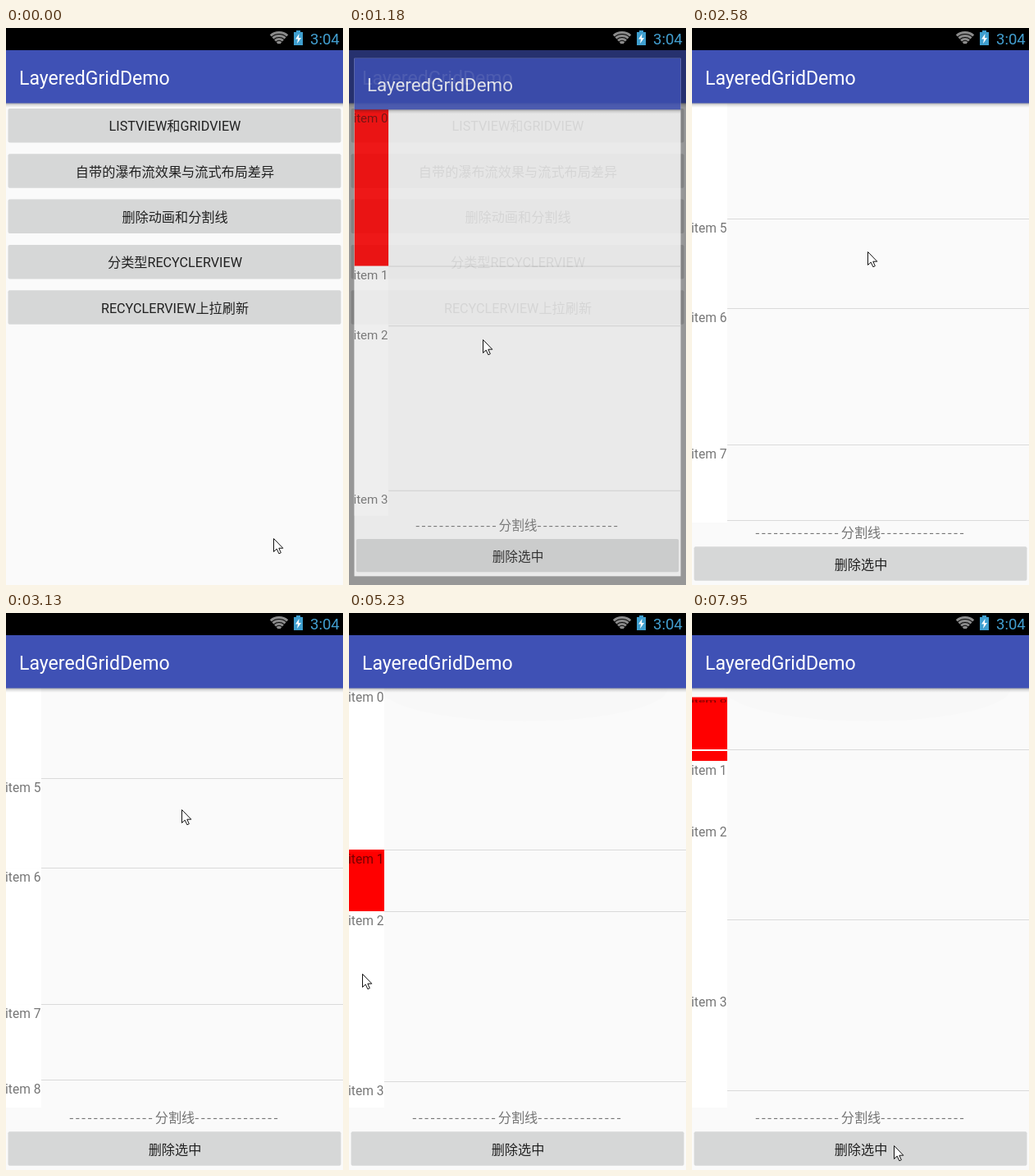
Animation of 411 by 678 pixels, one loop 8 s. Source, as an HTML page with a canvas:

```html
<!DOCTYPE html>
<html lang="zh-CN">
<head>
<meta charset="utf-8">
<style>
html, body { margin: 0; width: 100%; height: 100%; overflow: hidden; background: #fafafa; }
canvas { display: block; width: 411px; height: 678px; }
</style>
</head>
<body>
<canvas></canvas>
<script>
const W = 411, H = 678, LOOP = 8000;
const ratio = window.devicePixelRatio || 1;
const canvas = document.querySelector('canvas');
const layer = document.createElement('canvas');
canvas.width = layer.width = W * ratio;
canvas.height = layer.height = H * ratio;
const ctx = canvas.getContext('2d');
const layerCtx = layer.getContext('2d');

const FONT = 'Roboto, "Noto Sans CJK SC", sans-serif';
const DASH_FONT = '"Noto Sans CJK SC", Roboto, sans-serif';
const TITLE = 'LayeredGridDemo';
const MENU = ['LISTVIEW和GRIDVIEW', '自带的瀑布流效果与流式布局差异', '删除动画和分割线',
  '分类型RECYCLERVIEW', 'RECYCLERVIEW上拉刷新'];
const HEIGHTS = [197, 75, 207, 208, 180, 109, 166, 92, 180];
const LIST_TOP = 91, LIST_END = 602, COLUMN = 43;
const OPEN_AT = 1000, REMOVE_AT = 7700;
const SCROLL_AT = 1420, SCROLL_TIME = 2935, SWIPE = 585;

// Where the pointer rests and when it gets there.
const STOPS = [
  { at: 0, x: 326, y: 621 },
  { at: 720, x: 185, y: 236 },
  { at: 1180, x: 163, y: 379 },
  { at: 2580, x: 214, y: 271 },
  { at: 3750, x: 200, y: 210 },
  { at: 4080, x: 190, y: 560 },
  { at: 4600, x: 15, y: 316 },
  { at: 5200, x: 16, y: 439 },
  { at: 6180, x: 26, y: 205 },
  { at: 6940, x: 357, y: 645 },
  { at: 7260, x: 246, y: 648 },
];
const ARROW = new Path2D('M0 0V16L3.7 12.6 6.4 18.3 8.8 17.2 6.3 11.7H11.3Z');
const BOLT = new Path2D('M357.5 7 353 13.5H356L355 19 360 12H357Z');

const clamp = v => Math.min(1, Math.max(0, v));
const ease = u => (1 - Math.cos(Math.PI * clamp(u))) / 2;
const scrollAt = t => 810.6 * Math.sin(Math.PI * clamp((t - SCROLL_AT) / SCROLL_TIME)) ** 2;

function rect(x, y, w, h, color) {
  ctx.fillStyle = color;
  ctx.fillRect(x, y, w, h);
}

function text(str, x, y, size, color, align = 'left', font = FONT) {
  ctx.font = `${size}px ${font}`;
  ctx.textAlign = align;
  ctx.fillStyle = color;
  ctx.fillText(str, x, y);
}

function button(label, y, pressed) {
  ctx.fillStyle = pressed ? '#c8cacb' : '#d6d7d7';
  ctx.beginPath();
  ctx.roundRect(2.5, y, 406, 41.5, 2);
  ctx.fill();
  text(label, 206, y + 27.3, 16.17, '#212121', 'center');
}

function header() {
  const shadow = ctx.createLinearGradient(0, 91, 0, 97);
  shadow.addColorStop(0, 'rgba(0,0,0,.35)');
  shadow.addColorStop(.5, 'rgba(0,0,0,.1)');
  shadow.addColorStop(1, 'rgba(0,0,0,0)');
  rect(0, 91, W, 6, shadow);
  rect(0, 27, W, 64.5, '#3f51b5');
  text(TITLE, 16, 68.7, 23.1, '#fff');
}

function statusBar() {
  rect(0, 0, W, 27, '#000');
  ctx.strokeStyle = '#8b8b8b';
  ctx.lineWidth = 3;
  for (let r = 3.5; r < 16; r += 4) {
    ctx.beginPath();
    ctx.arc(333, 21, r, -Math.PI / 2 - .72, -Math.PI / 2 + .72);
    ctx.stroke();
  }
  rect(354, 3, 5, 3, '#3f9fcf');
  rect(351, 5, 11, 16, '#3f9fcf');
  ctx.fillStyle = '#fff';
  ctx.fill(BOLT);
  text('3:04', 371, 19.6, 18.5, '#429fd0');
}

function menuScreen(t) {
  rect(0, 27, W, H - 27, '#fafafa');
  MENU.forEach((label, i) => button(label, 98 + i * 55.3, i === 2 && t > 780 && t < 960));
  header();
}

function item(i, y, h, selected) {
  ctx.save();
  ctx.translate(0, y);
  ctx.scale(1, h / HEIGHTS[i]);
  rect(0, 0, COLUMN, HEIGHTS[i] + .5, selected ? '#f00' : '#fff');
  text('item ' + i, -1, 17, 15.6, 'rgba(0,0,0,.54)');
  ctx.restore();
}

function overscrollGlow() {
  ctx.fillStyle = 'rgba(0,0,0,.008)';
  ctx.beginPath();
  ctx.ellipse(214, 92, 175, 40, 0, 0, Math.PI);
  ctx.fill();
}

function list(t) {
  const selected = t < 4770 ? 0 : t < 5550 ? 1 : t < 6330 ? 2 : 0;
  const removing = t >= REMOVE_AT;
  const p = ease((t - REMOVE_AT) / 473);
  const shift = removing ? HEIGHTS[0] * (1 - p) : 0;
  let y = LIST_TOP - scrollAt(t);

  ctx.save();
  ctx.beginPath();
  ctx.rect(0, LIST_TOP, W, LIST_END - LIST_TOP);
  ctx.clip();
  if (t > SCROLL_AT + SCROLL_TIME) overscrollGlow();
  if (removing) item(0, y + 21 * p, Math.max(1, shift - 21 * p), true);
  HEIGHTS.forEach((h, i) => {
    if (removing && i === 0) return;
    item(i, y + shift, h, i === selected);
    y += h;
    const line = Math.round(y);
    rect(COLUMN, line, W - COLUMN, 1, '#dadada');
    if (removing) rect(0, line, COLUMN, 2, '#fff');
  });
  ctx.restore();
}

function listScreen(t) {
  rect(0, 27, W, H - 27, '#fafafa');
  list(t);
  text('分割线', 206, 620, 16.17, '#757575', 'center');
  ctx.letterSpacing = '1.8px';
  for (const x of [77, 230]) text('-'.repeat(14), x, 620, 16.17, '#757575', 'left', DASH_FONT);
  ctx.letterSpacing = '0px';
  button('删除选中', 631.3, t > 7560 && t < REMOVE_AT);
  header();
}

// The list grows to full size while the dimmed menu fades away over it.
function openList(t, p) {
  menuScreen(t);
  rect(0, 27, W, H - 27, `rgba(0,0,0,${.47 * p})`);
  layerCtx.drawImage(canvas, 0, 0);
  const s = .8 + .2 * p;
  ctx.save();
  ctx.translate(W / 2 * (1 - s), H / 2 * (1 - s));
  ctx.scale(s, s);
  listScreen(t);
  ctx.restore();
  ctx.globalAlpha = 1 - p;
  ctx.drawImage(layer, 0, 0, W, H);
  ctx.globalAlpha = 1;
}

function pointer(t) {
  const i = STOPS.findLastIndex(s => s.at <= t);
  const from = STOPS[i], to = STOPS[i + 1] || from;
  const travel = Math.min(480, to.at - from.at);
  const u = travel ? ease(1 - (to.at - t) / travel) : 0;
  const scrolling = t > SCROLL_AT && t < SCROLL_AT + SCROLL_TIME;
  const swing = scrolling ? 90 * Math.sin(2 * Math.PI * (t - 2580) / SWIPE) : 0;

  ctx.save();
  ctx.translate(Math.round(from.x + (to.x - from.x) * u) + .5,
    Math.round(from.y + (to.y - from.y) * u + swing) + .5);
  ctx.fillStyle = '#fff';
  ctx.strokeStyle = '#111';
  ctx.lineWidth = 1;
  ctx.fill(ARROW);
  ctx.stroke(ARROW);
  ctx.restore();
}

function draw(t) {
  ctx.setTransform(ratio, 0, 0, ratio, 0, 0);
  const p = 1 - (1 - clamp((t - OPEN_AT) / 300)) ** 2;
  if (p === 0) menuScreen(t);
  else if (p === 1) listScreen(t);
  else openList(t, p);
  statusBar();
  pointer(t);
}

const start = performance.now();
function frame() {
  draw(Math.max(0, performance.now() - start) % LOOP);
  requestAnimationFrame(frame);
}
frame();
</script>
</body>
</html>
```
